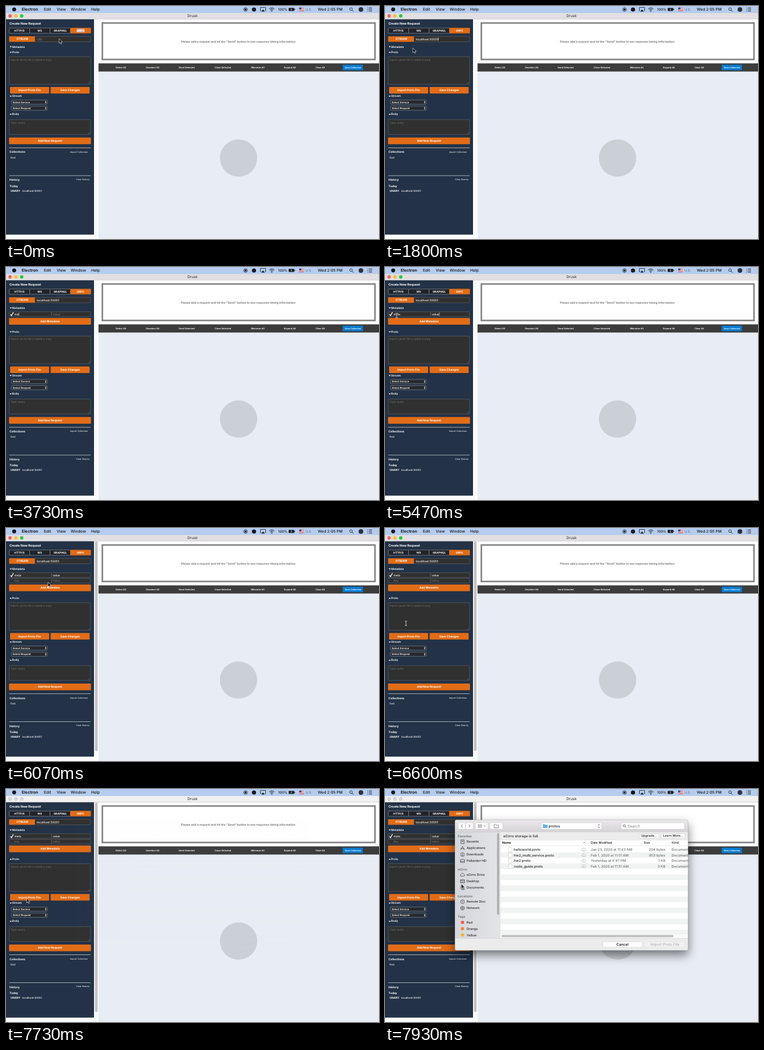
Write an HTML page that moves like this. It is 640x400 px and loops after 8000 ms.

```html
<!DOCTYPE html>
<html lang="en">
<head>
<meta charset="utf-8">
<title>Request builder</title>
<style>
html, body { margin: 0; width: 100%; height: 100%; overflow: hidden; background: #fff; }
svg { display: block; width: 640px; height: 400px; }
text { font-family: Inter, "Liberation Sans", sans-serif; text-rendering: geometricPrecision; white-space: pre; }
</style>
</head>
<body>
<svg id="stage" viewBox="0 0 640 400"></svg>
<script>
const ORANGE = '#e26c17', NAVY = '#233246', FIELD = '#303030', HINT = '#757575';
const LOOP = 8000;

// Markup helpers; text is placed by its vertical centre.
const text = (x, y, s, size, fill = '#fff', weight = 500, anchor = 'start', extra = '') =>
  `<text x="${x}" y="${y + size * 0.36}" font-size="${size}" fill="${fill}" font-weight="${weight}" text-anchor="${anchor}" ${extra}>${s}</text>`;
const mid = (x, y, s, size, fill, weight) => text(x, y, s, size, fill, weight, 'middle');
const rect = (x, y, w, h, fill, r = 0, extra = '') =>
  `<rect x="${x}" y="${y}" width="${w}" height="${h}" rx="${r}" fill="${fill}" ${extra}/>`;
const dot = (x, y, r, fill, extra = '') => `<circle cx="${x}" cy="${y}" r="${r}" fill="${fill}" ${extra}/>`;
const line = (d, color, width = 0.7, extra = '') =>
  `<path d="${d}" fill="none" stroke="${color}" stroke-width="${width}" ${extra}/>`;
const shape = (d, fill, extra = '') => `<path d="${d}" fill="${fill}" ${extra}/>`;
const group = (id, body, extra = '') => `<g id="${id}" ${extra}>${body}</g>`;
const edge = (color, width = 0.6) => `stroke="${color}" stroke-width="${width}"`;

const button = (x, y, w, h, label) =>
  rect(x, y, w, h, ORANGE, 1.2) + mid(x + w / 2, y + h / 2, label, 4.8, '#fff', 700);
const field = (x, y, w, h) => rect(x, y, w, h, FIELD, 0.8, edge('#686868'));
const opened = (x, y) => shape(`M${x} ${y - 0.4}h3.8l-1.9 2z`, '#fff');
const section = (y, label) => opened(6.2, y) + text(10.5, y, label, 4.75, '#fff', 600);
const grip = (x, y) => line(`M${x - 3} ${y}l3 -3M${x - 1.3} ${y}l1.3 -1.3`, '#999', 0.4);
const area = (y, h, hint) =>
  field(5.3, y, 139.8, h) + text(8, y + 5, hint, 4.55, HINT, 400) + grip(144, y + h - 1);
const select = (y, label) =>
  rect(9.3, y, 61.6, 7.2, '#262a30', 1.5, edge('#a5a9ae', 0.5)) + text(11.5, y + 3.6, label, 4.3, '#fff', 600) +
  shape(`M66.8 ${y + 3.1}l1.3 -1.8l1.3 1.8zM66.8 ${y + 4.1}l1.3 1.8l1.3 -1.8z`, '#fff');

function menuBar() {
  const ink = '#14171d';
  const menus = [[65, 'Edit'], [87, 'View'], [111, 'Window'], [146, 'Help']];
  return rect(0, 0, 640, 12, '#b5ccee') + dot(14, 5.8, 3.4, ink) +
    text(27, 5.7, 'Electron', 6.95, ink, 700) +
    menus.map(([x, s]) => text(x, 5.7, s, 6.75, ink)).join('') +
    dot(411, 6, 3.1, 'none', edge(ink, 0.8)) + dot(411, 6, 1.7, ink) + dot(425.5, 6, 3.6, ink) +
    line('M438 8h-1.5v-5.5h9v5.5h-1.5', ink, 0.8) + shape('M441 6l3 3.6h-6z', ink) +
    line('M451.5 5a6.3 6.3 0 0 1 9 0M453 6.6a4.2 4.2 0 0 1 6 0M454.6 8.1a2 2 0 0 1 2.8 0', ink, 0.9) + dot(456, 9.2, 0.7, ink) +
    text(467, 5.7, '100%', 5.9, ink) +
    rect(485, 3.2, 9.5, 5.2, ink, 1) + rect(495, 4.8, 0.9, 2, ink) + line('M490.3 3.7l-1.5 2.2h2l-1.5 2.2', '#dfe8f5', 0.6) +
    rect(503, 2.7, 8.5, 6, '#f5f5f5') + line('M503 3.2h8.5M503 5.1h8.5M503 7h8.5M503 8.5h8.5', '#c8414c', 0.8) + rect(503, 2.7, 3.8, 3.1, '#364a86') +
    text(514, 5.7, 'U.S.', 5.6, '#66738a') + text(535, 5.7, 'Wed 2:05 PM', 6.65, ink) +
    dot(592, 5.3, 2.3, 'none', edge(ink, 0.8)) + line('M593.7 7l2.5 2.6', ink, 0.9) +
    dot(609, 6, 4, '#30313c') +
    line('M620 3.3h1M622.5 3.3h5.5M620 6h1M622.5 6h5.5M620 8.7h1M622.5 8.7h5.5', ink, 0.9);
}

function titleBar() {
  const lights = ['#f95f57', '#fbbd2e', '#29c841'];
  return rect(0, 12, 640, 10.5, '#e1dfe1') + rect(0, 22, 640, 0.5, '#bdbbbd') +
    lights.map((c, i) => dot(7 + 10 * i, 17, 2.9, c)).join('') +
    group('dimLights', rect(0, 12, 640, 10, '#f1f0f1') +
      lights.map((c, i) => dot(7 + 10 * i, 17, 2.9, '#d8d6d8', edge('#c2c0c2', 0.4))).join('')) +
    mid(320, 17, 'Drusk', 6.3, '#454545');
}

function sidebar() {
  const tabs = ['HTTP/S', 'WS', 'GRAPHQL', 'GRPC'];
  const tab = (s, i) => {
    const [fill, rim] = s === 'GRPC' ? [ORANGE, ORANGE] : ['#20242a', '#aeb3b9'];
    return rect(5.5 + 35 * i, 37.8, 35, 9, fill, 0.8, edge(rim, 0.5));
  };
  const row = y => field(5.3, y, 72.8, 8.3) + field(78.4, y, 66.7, 8.3);
  const rule = y => rect(5.5, y, 139.8, 0.8, '#c4cad2');
  const lower =
    section(79.2, 'Proto') + area(87, 47.5, 'Import .proto file or paste a copy') +
    button(7, 139, 67, 11.3, 'Import Proto File') + button(76.5, 139, 67, 11.3, 'Save Changes') +
    section(154.3, 'Stream') + select(161.4, 'Select Service') + select(171.9, 'Select Request') +
    section(185.6, 'Body') + area(195, 25.5, 'Type query') +
    button(5.2, 225.7, 140.6, 11.5, 'Add New Request') + rule(243) +
    text(6, 250.7, 'Collections', 4.9, '#fff', 700) + text(110, 250.2, 'Import Collection', 3.7, '#e6e9ed') +
    text(7.8, 260, 'first', 4.4) + rule(290.8) +
    text(6, 298.7, 'History', 4.9, '#fff', 700) + text(120, 297.7, 'Clear History', 3.75, '#e6e9ed') +
    text(6, 308.8, 'Today', 4.9, '#fff', 700) +
    text(8, 317.1, 'UNARY', 4.6, '#fff', 700) + text(28, 317.2, 'localhost:50051', 4.45);
  return rect(0, 22.5, 158.5, 377.5, '#fafafa') + rect(0, 22.5, 151, 370, NAVY) +
    group('thumb', rect(152.6, 23, 4.6, 360, '#c2c2c2', 2.3)) +
    text(6, 30.5, 'Create New Request', 5.45, '#fff', 700) + tabs.map(tab).join('') +
    group('picked', rect(121, 39.3, 14, 5.8, '#c9c2dc', 0, 'opacity=".75"')) +
    tabs.map((s, i) => mid(23 + 35 * i, 42.3, s, 4.65, '#fff', 700)).join('') +
    field(49.5, 52.2, 95.6, 9.2) + rect(5.3, 52, 44.2, 9.6, ORANGE, 0.8) + mid(28, 56.8, 'STREAM', 4.7, '#fff', 700) +
    text(53, 56.8, 'URL', 5.05, HINT, 500, 'start', 'id="url"') +
    text(10.5, 69.8, 'Metadata', 4.75, '#fff', 600) +
    group('shut', shape('M7.4 68l2.1 1.8l-2.1 1.8z', '#fff')) +
    group('meta', opened(6.2, 69.8) + row(76.8) +
      group('tick', line('M7.6 81.2l1.8 2.3l3.4 -5.8', '#fff', 1.3)) +
      text(14.5, 81, 'Key', 4.75, HINT, 500, 'start', 'id="key"') +
      text(80.3, 81, 'Value', 4.75, HINT, 500, 'start', 'id="val"') +
      group('extra', row(86.2) + text(14.5, 90.4, 'Key', 4.75, HINT) + text(80.3, 90.4, 'Value', 4.75, HINT)) +
      group('addMeta', button(5.2, 87.4, 140.6, 11.5, 'Add Metadata'))) +
    group('lower', lower) + rect(0, 0, 0.6, 5.6, '#fff', 0, 'id="caret"');
}

function mainPane() {
  const actions = [[197, 'Select All'], [251.5, 'Deselect All'], [310, 'Send Selected'], [372, 'Close Selected'],
    [432, 'Minimize All'], [487, 'Expand All'], [539, 'Clear All']];
  return rect(158.5, 22.5, 481.5, 76, '#fcfcfc') + rect(158.5, 98.5, 481.5, 301.5, '#e8ecf4') +
    rect(165.3, 29.2, 467.8, 62.6, '#fff', 0, edge('#858585', 2.7)) +
    mid(399.3, 60.8, 'Please add a request and hit the "Send" button to see response timing information.', 4.92, '#787878', 700) +
    rect(158.5, 98.5, 481.5, 14, '#3c3c3c') +
    actions.map(([x, s]) => mid(x, 105.5, s, 3.95, '#fff', 600)).join('') +
    rect(577.7, 100.8, 34.7, 9.4, '#087bd0', 0.7) + mid(595.2, 105.5, 'Save Collection', 3.75, '#fff', 600) +
    dot(399, 261, 32, '#cbd0d6');
}

const ICONS = {
  clock: 'M-2.8 -3.3h5.6v6.6h-5.6zM-1.5 -1.5h3M-1.5 .2h3',
  apps: 'M-3 3l3 -6.2l3 6.2M-3.6 1h7.2',
  down: 'M-3.3 0a3.3 3.3 0 1 0 6.6 0a3.3 3.3 0 1 0 -6.6 0M0 -1.8v3.4M-1.4 .4l1.4 1.4l1.4 -1.4',
  disk: 'M-3.5 -2.5h7v5h-7zM-3.5 .7h7',
  cloud: 'M-2.3 2.2a1.7 1.7 0 0 1 0 -3.3a2.5 2.5 0 0 1 4.7 0a1.7 1.7 0 0 1 0 3.3z',
  desk: 'M-3.5 -2.6h7v5.2h-7zM-3.5 -1.4h7M-2 1.3h4',
  docs: 'M-3 -3.3h4v5h-4zM-1 1.7v1.6h4v-5h-2',
  disc: 'M-3.3 0a3.3 3.3 0 1 0 6.6 0a3.3 3.3 0 1 0 -6.6 0M-.8 0a.8 .8 0 1 0 1.6 0a.8 .8 0 1 0 -1.6 0',
  globe: 'M-3.3 0a3.3 3.3 0 1 0 6.6 0a3.3 3.3 0 1 0 -6.6 0M-3.3 0h6.6M0 -3.3v6.6'
};
const icon = (x, y, name, color = '#5a5a5d', width = 0.9) =>
  line(ICONS[name], color, width, `transform="translate(${x} ${y})"`);

function dialog() {
  const heads = [[81, 'Favorites'], [138, 'eCirro'], [184, 'Locations'], [219, 'Tags']];
  const places = [[90.5, 'clock', 'Recents'], [101.5, 'apps', 'Applications'], [112.5, 'down', 'Downloads'],
    [123.5, 'disk', 'Pellandor HD'], [147.5, 'cloud', 'eCirro Drive'], [158.5, 'desk', 'Desktop'],
    [169.5, 'docs', 'Documents'], [193.5, 'disc', 'Remote Disc'], [204.5, 'globe', 'Network']];
  const tags = [['#f9534c', 'Red'], ['#f58533', 'Orange'], ['#f6b42c', 'Yellow']];
  const files = [['helloworld.proto', 'Jan 23, 2020 at 11:43 AM', '204 bytes'],
    ['hw2_multi_service.proto', 'Feb 1, 2020 at 11:51 AM', '853 bytes'],
    ['hw2.proto', 'Yesterday at 4:47 PM', '1 KB'], ['route_guide.proto', 'Feb 1, 2020 at 11:51 AM', '3 KB']];
  const white = (x, y, w, h) => rect(x, y, w, h, '#fdfdfd', 1.8, edge('#c2c0c2', 0.5));
  const ink = '#1c1c1c', gray = '#6c6c6c';

  const top = rect(120, 53, 400, 21.5, 'url(#bar)') + rect(120, 74, 400, 0.5, '#b9b7b9') +
    white(125.5, 58, 12.5, 11) + white(138.5, 58, 12.5, 11) +
    line('M133 61l-2.4 2.5l2.4 2.5', '#606060', 0.9) + line('M143.5 61l2.4 2.5l-2.4 2.5', '#606060', 0.9) +
    white(155, 58, 22, 11) + line('M159.5 61.5h7M159.5 63.5h7M159.5 65.5h7', '#606060', 1, 'stroke-dasharray="1.8 .8"') +
    line('M169.5 62.8l1.5 1.5l1.5 -1.5', '#606060', 0.8) +
    white(180, 58, 22, 11) + line('M187 61h2.8l1 1h4.2v4.6h-8z', '#606060') +
    white(268, 58, 104, 11) + shape('M271 60.5h3l1 1h4v5.5h-8z', '#5fb3e4') + text(280.5, 63.5, 'protos', 6.4, ink) +
    line('M365.4 62.6l1.7 -1.9l1.7 1.9M365.4 64.6l1.7 1.9l1.7 -1.9', '#444', 0.8) +
    white(405, 58, 109, 11) + dot(410.5, 63, 1.9, 'none', edge('#555', 0.8)) + line('M412 64.5l1.8 1.8', '#555', 0.8) +
    text(416.5, 63.6, 'Search', 6.3, '#858585', 400);

  const side = rect(120, 74.5, 77.5, 182, 'url(#glass)') +
    heads.map(([y, s]) => text(125, y, s, 5.35, '#68686c', 600)).join('') +
    places.map(([y, i, s]) => icon(133, y, i) + text(140, y, s, 5.45, '#262626')).join('') +
    tags.map(([c, s], i) => dot(133, 229 + 10.8 * i, 2.8, c) + text(140, 229 + 10.8 * i, s, 5.45, '#262626')).join('') +
    rect(192.2, 76, 3.8, 140, '#b0b0b4', 1.9) + rect(197.3, 74.5, 0.5, 182, '#c8c7c9');

  let list = rect(197.8, 74.5, 322.2, 182, '#fff') + rect(197.8, 74.5, 322.2, 13, '#ececec') +
    text(203, 80.7, 'eCirro storage is full.', 6.1, '#3c3c3c', 600) +
    white(436, 76.6, 34, 7.8) + mid(453, 80.5, 'Upgrade...', 5.5, ink) +
    white(474, 76.6, 41, 7.8) + mid(494.5, 80.5, 'Learn More...', 5.5, ink) +
    rect(197.8, 87.3, 322.2, 0.4, '#d0d0d0') + rect(197.8, 97, 322.2, 0.4, '#d0d0d0') +
    text(201, 92.3, 'Name', 5.35, ink, 700) + line('M340 93.2l1.8 -1.8l1.8 1.8', '#666') +
    text(353, 92.3, 'Date Modified', 5.45, ink) + text(444, 92.3, 'Size', 5.45, ink) + text(492, 92.3, 'Kind', 5.45, ink) +
    line('M349 89v7M440 89v7M487.5 89v7', '#d2d2d2', 0.5);
  for (let i = 1; i < 16; i += 2) list += rect(197.8, 99.2 + 9.5 * i, 322.2, 9.5, '#f1f2f2');
  files.forEach(([name, date, size], i) => {
    const y = 104 + 9.5 * i;
    list += shape(`M212 ${y - 3.6}h4l2 2v5.4h-6z`, '#fff', edge('#b5b5b5', 0.5)) + text(221, y, name, 5.9, ink) +
      icon(341, y, 'cloud', '#b0b0b0', 0.7) + line(`M341 ${y - 1}v3.5`, '#b0b0b0', 0.6) +
      text(353, y, date, 5.9, gray) + text(481, y, size, 5.9, gray, 500, 'end') + text(491.5, y, 'Document', 5.9, gray);
  });
  list += rect(197.8, 249.6, 322.2, 6.8, '#fafafa') + rect(200, 250.6, 295, 4, '#c0c0c0', 2);

  const foot = rect(120, 256.5, 400, 20.5, '#ececec') + rect(120, 256.3, 400, 0.5, '#c6c6c6') +
    white(373.5, 262, 68, 10) + mid(407.5, 267, 'Cancel', 6.2, ink, 600) +
    rect(446, 262, 68.5, 10, '#f2f2f2', 1.8, edge('#d6d6d6', 0.5)) + mid(480.3, 267, 'Import Proto File', 6.3, '#acacac');

  return rect(120, 53, 400, 224, '#ececec', 3, 'filter="url(#shadow)"') +
    `<g clip-path="url(#sheet)">${top + side + list + foot}</g>` + rect(120, 53, 400, 224, 'none', 3, edge('#999', 0.4));
}

const beam = 'M-1.8 -3.9q1.8 0 1.8 1.2v5.4q0 1.2 -1.8 1.2M1.8 -3.9q-1.8 0 -1.8 1.2M1.8 3.9q-1.8 0 -1.8 -1.2M-1 1h2';
const pointers =
  group('arrow', shape('M0 0v8l1.9 -1.7l1.4 3l1.3 -.6l-1.4 -2.9h2.5z', '#0a0a0a', edge('#fff', 0.6))) +
  group('hand', shape('M-.7 .3q.8 -.8 1.4 .2v2.4l2.6 .7q.7 .3 .5 1.2l-.7 2.6h-3.5l-1.9 -2.8q.3 -1 1.6 0z', '#111', edge('#fff', 0.6))) +
  group('ibeam', line(beam, '#e4e4e4', 1.5) + line(beam, '#111', 0.6));

const defs = `<defs>
  <linearGradient id="bar" x2="0" y2="1"><stop stop-color="#ebe9eb"/><stop offset="1" stop-color="#d4d2d4"/></linearGradient>
  <linearGradient id="glass"><stop stop-color="#d4d6db"/><stop offset="1" stop-color="#e4e4e7"/></linearGradient>
  <clipPath id="sheet"><rect x="120" y="53" width="400" height="224" rx="3"/></clipPath>
  <filter id="shadow" x="-10%" y="-15%" width="120%" height="135%"><feDropShadow dx="0" dy="8" stdDeviation="8.5" flood-opacity=".52"/></filter>
</defs>`;

document.getElementById('stage').innerHTML =
  defs + mainPane() + sidebar() + titleBar() + menuBar() + group('dialog', dialog()) + group('pointer', pointers);

const $ = Object.fromEntries([...document.querySelectorAll('[id]')].map(e => [e.id, e]));
const show = (el, on) => el.setAttribute('visibility', on ? 'inherit' : 'hidden');
const move = (el, x, y) => el.setAttribute('transform', `translate(${x} ${y})`);

// time, x, y, pointer from then on
const path = [
  [0, 91, 56, 'arrow'], [70, 91, 56, 'ibeam'], [270, 88, 58, 'ibeam'], [1000, 88, 58, ''],
  [1730, 58, 67, 'arrow'], [1800, 48, 72, 'arrow'], [2070, 14, 70, 'hand'], [2200, 9, 69.5, 'hand'],
  [2670, 9, 69.5, 'hand'], [2800, 12, 76, 'ibeam'], [3200, 20, 82, 'ibeam'], [3600, 20, 83, ''],
  [5470, 20, 83, 'ibeam'], [5600, 40, 88, 'arrow'], [5800, 72, 93, 'arrow'], [6400, 72, 93, 'arrow'],
  [6470, 60, 118, 'ibeam'], [6600, 36, 163.5, 'ibeam'], [6900, 36, 174, 'arrow'], [7200, 36, 187, 'arrow'],
  [7530, 35, 187.5, 'arrow'], [7730, 35, 187.5, 'arrow'], [7930, 131, 163, 'arrow'], [LOOP, 131, 163, 'arrow']
];
const urlTimes = [...'localhost:50051'].map((c, i) => 1000 + 87 * Math.floor(i / 1.5));
const keyTimes = [3600, 3730, 4000, 4070];
const valTimes = [4670, 4770, 4870, 4970, 5070];

function type(el, hint, word, times, t) {
  const n = times.filter(at => t >= at).length;
  const s = n ? word.slice(0, n) : hint;
  if (el.textContent !== s) el.textContent = s;
  el.setAttribute('fill', n ? '#fff' : HINT);
  return n;
}

function placeCaret(el, n, y) {
  const x = +el.getAttribute('x') + (n ? el.getComputedTextLength() + 0.2 : -0.4);
  move($.caret, x, y);
}

function render(t) {
  const open = t >= 2270, added = t >= 5930;
  show($.picked, t < 130);
  show($.shut, !open);
  show($.meta, open);
  show($.extra, added);
  show($.thumb, added);
  show($.tick, t >= 3600);
  move($.addMeta, 0, added ? 9.5 : 0);
  move($.lower, 0, added ? 41.2 : open ? 31.7 : 0);

  const u = type($.url, 'URL', 'localhost:50051', urlTimes, t);
  const k = type($.key, 'Key', 'meta', keyTimes, t);
  const v = type($.val, 'Value', 'value', valTimes, t);
  if (t < 2270) placeCaret($.url, u, 53.9);
  else if (t < 4400) placeCaret($.key, k, 78.2);
  else placeCaret($.val, v, 78.2);
  show($.caret, (t >= 200 && t < 730) || (t >= 1000 && t < 2270) || (t >= 3200 && t < 5570));

  const i = path.findIndex((p, j) => t < path[j + 1][0]);
  const [t0, x0, y0, kind] = path[i], [t1, x1, y1] = path[i + 1];
  const f = (t - t0) / (t1 - t0);
  move($.pointer, x0 + (x1 - x0) * f, y0 + (y1 - y0) * f);
  for (const id of ['arrow', 'hand', 'ibeam']) show($[id], id === kind);

  show($.dimLights, t >= 7730);
  $.dialog.setAttribute('opacity', Math.max(0, Math.min(1, (t - 7730) / 180)));
  show($.dialog, t >= 7730);
}

const start = performance.now();
function tick() {
  render((performance.now() - start) % LOOP);
  requestAnimationFrame(tick);
}
tick();
</script>
</body>
</html>
```
